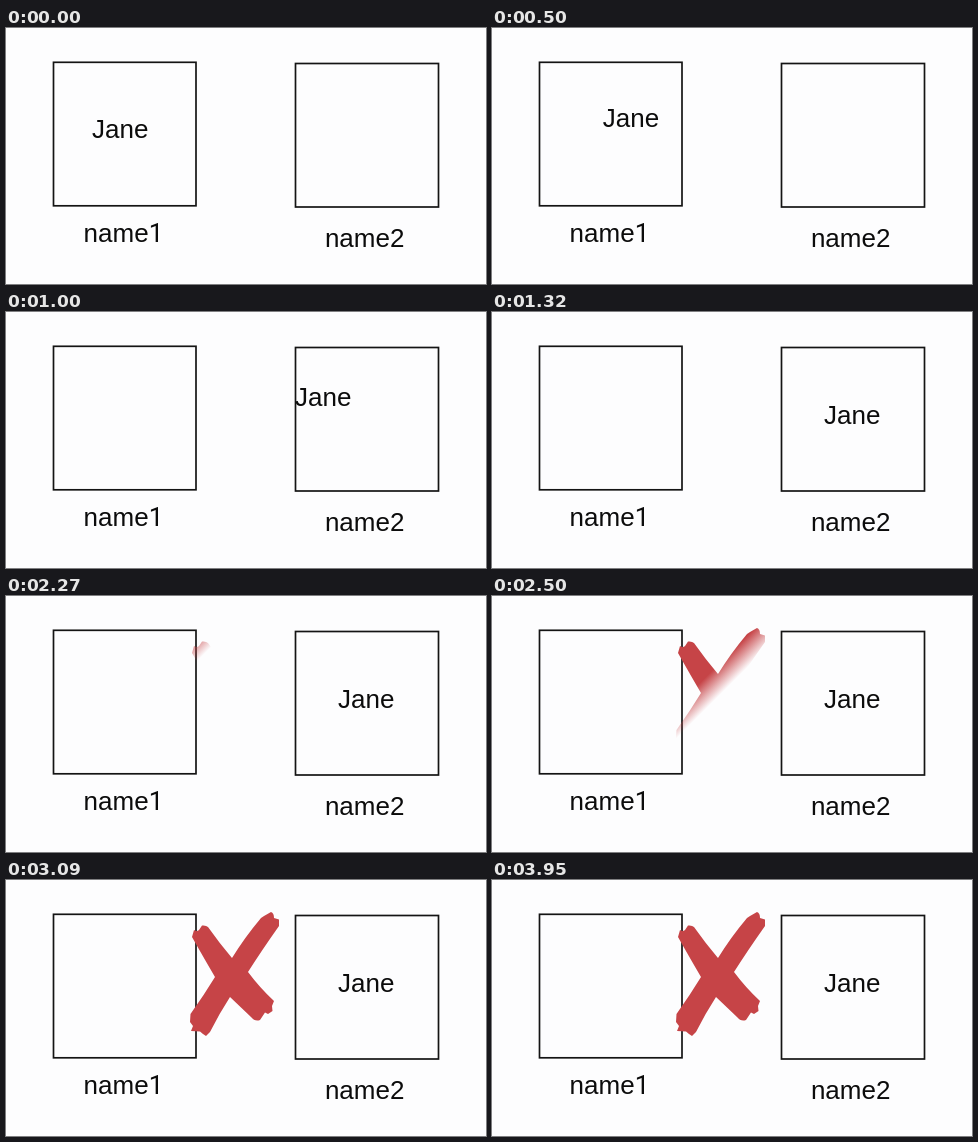
Recreate the animation shown at these times as an HTML page. Size 480x256 px, loop 4780 ms.

```html
<!DOCTYPE html>
<html lang="en">
<head>
<meta charset="utf-8">
<title>Moving a value</title>
<style>
  html, body { margin: 0; width: 100%; height: 100%; overflow: hidden; background: #fdfdfe; }
  svg { display: block; width: 480px; height: 256px; }
  text { font: 26px "Liberation Sans", Arial, sans-serif; fill: #0c0c0c; }
  .one { font-family: Roboto, sans-serif; }
  rect { fill: none; stroke: #141414; stroke-width: 1.7; }
</style>
</head>
<body>
<svg viewBox="0 0 480 256">
  <defs>
    <linearGradient id="wipe" gradientUnits="userSpaceOnUse">
      <stop offset="0" stop-color="#c64447"/>
      <stop offset="1" stop-color="#c64447" stop-opacity="0"/>
    </linearGradient>
  </defs>
  <rect x="47.5" y="34.3" width="142.5" height="143.5"/>
  <rect x="289.5" y="35.5" width="143" height="143.5"/>
  <text x="77.6" y="214">name<tspan class="one">1</tspan></text>
  <text x="318.9" y="219">name2</text>
  <text id="value" x="86" y="110">Jane</text>
  <path id="cross" fill="url(#wipe)" d="M186 57 L188 50 Q191 52 193 50 L196 45.5 Q200 45 202 47
    Q214 64 226 78 Q239 57 255 38 L258 36 L265 32 Q268 33 268 38 L273 39.5 L273 46
    Q256 70 242 92 Q254 108 268 121 L266 126 L266.5 131 L262 134 L259 132.5 L254 140 Q249 142 245 137
    L224 117 Q213 134 204 152 L200 156 L197 154 L194 151.5 L185 151 L187 146 L184 142 L184.5 134
    Q198 115 209 97 Q199 80 186 57 Z"/>
</svg>
<script>
const LOOP = 4780, FPS = 22;
const MOVE = { start: 273, length: 1024, dx: 246, dy: 1.7, rise: 30 };
const WIPE = { start: 2265, from: 254, speed: 0.31, soft: 32 };
const [value, cross, wipe] = ["value", "cross", "wipe"].map(id => document.getElementById(id));

const bezier = (s, a, b) => 3 * (1 - s) ** 2 * s * a + 3 * (1 - s) * s * s * b + s ** 3;

// Same curve as CSS ease-in-out
function easeInOut(x) {
  let low = 0, high = 1;
  for (let i = 0; i < 24; i++) {
    const mid = (low + high) / 2;
    if (bezier(mid, 0.42, 0.58) < x) low = mid; else high = mid;
  }
  return bezier(low, 0, 1);
}

function draw(t) {
  const p = easeInOut(Math.min(1, Math.max(0, (t - MOVE.start) / MOVE.length)));
  const y = MOVE.dy * p - MOVE.rise * 4 * p * (1 - p);
  value.setAttribute("transform", `translate(${MOVE.dx * p} ${y})`);

  // Soft diagonal edge sweeping from the top left
  const front = WIPE.from + WIPE.speed * (t - WIPE.start);
  const back = front - WIPE.soft;
  cross.style.visibility = t < WIPE.start ? "hidden" : "visible";
  for (const axis of ["x", "y"]) {
    wipe.setAttribute(axis + 1, back / 2);
    wipe.setAttribute(axis + 2, front / 2);
  }
}

const begin = performance.now();
function tick() {
  const t = (performance.now() - begin) % LOOP;
  draw(Math.floor((t + 5) * FPS / 1000) * 1000 / FPS);
  requestAnimationFrame(tick);
}
tick();
</script>
</body>
</html>
```
